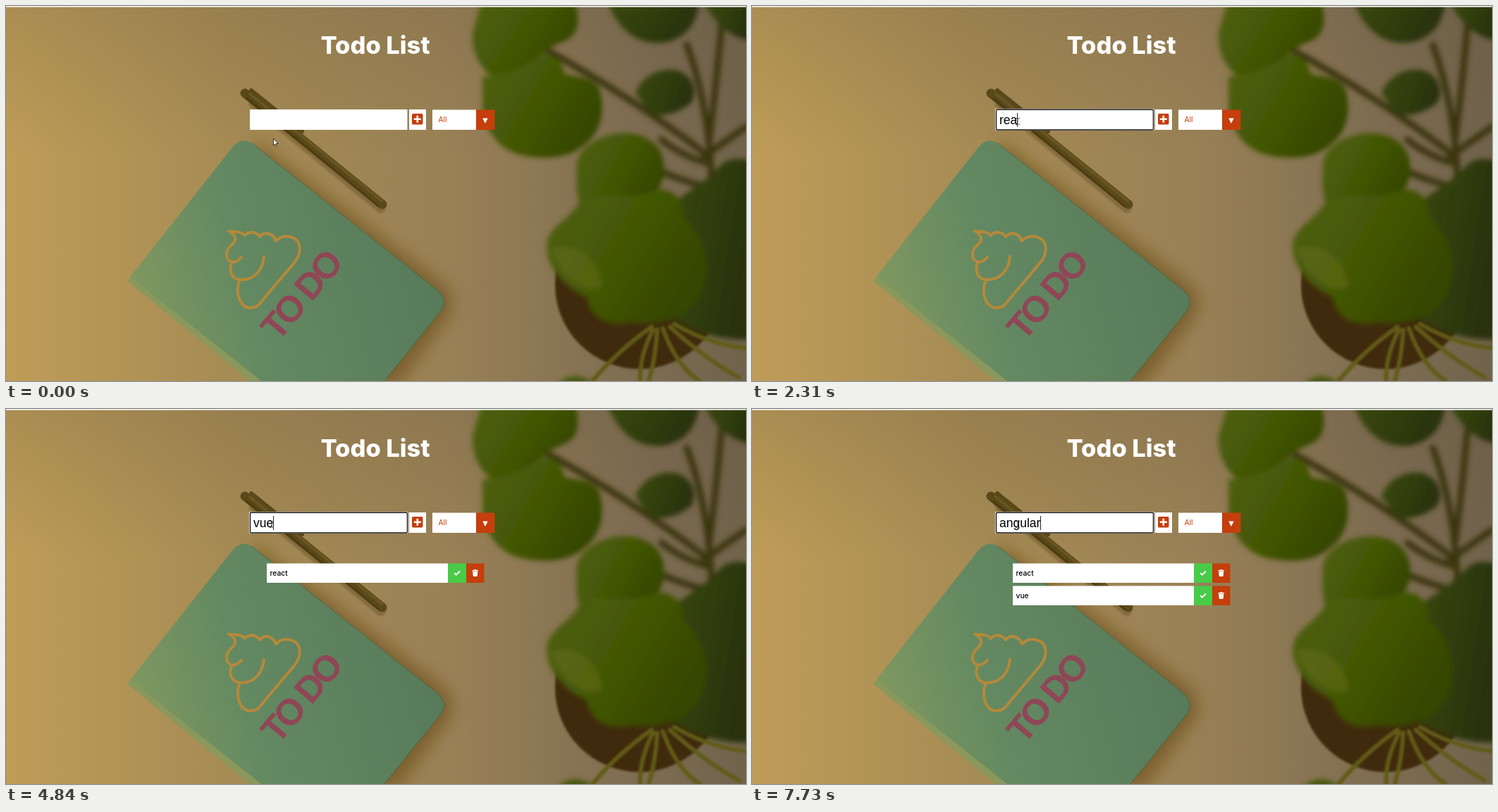
An HTML page that plays this animation: 1050 px wide and 533 px high, repeating every 8 s.

```html
<!DOCTYPE html>
<html lang="en">
<head>
<meta charset="utf-8">
<title>Todo List</title>
<style>
  html, body { margin: 0; width: 100%; height: 100%; overflow: hidden; background: #a08452; }
  svg { display: block; width: 1050px; height: 533px; }
  .ui { font-family: Inter, "Open Sans", sans-serif; }
  .box { fill: #fff; }
  .red { fill: #c43f0c; }
  .line { fill: none; stroke-linecap: round; stroke-linejoin: round; }
</style>
</head>
<body>
<svg viewBox="0 0 1050 533" xmlns="http://www.w3.org/2000/svg">
  <defs>
    <linearGradient id="desk">
      <stop offset="0" stop-color="#bf9d58"/>
      <stop offset=".3" stop-color="#a68b54"/>
      <stop offset=".6" stop-color="#998156"/>
      <stop offset=".85" stop-color="#7e6d52"/>
      <stop offset="1" stop-color="#70634c"/>
    </linearGradient>
    <radialGradient id="glow" gradientUnits="userSpaceOnUse" r="1" gradientTransform="translate(0 533) scale(640 440)">
      <stop offset="0" stop-color="#e7ba60"/>
      <stop offset=".3" stop-color="#dcb05d" stop-opacity=".8"/>
      <stop offset="1" stop-color="#c9a057" stop-opacity="0"/>
    </radialGradient>
    <linearGradient id="shade" x1="0" y1="0" x2="0" y2="1">
      <stop offset="0" stop-color="#5d4f3c" stop-opacity=".2"/>
      <stop offset=".4" stop-color="#6b5532" stop-opacity="0"/>
    </linearGradient>
    <linearGradient id="cover" x1="0" y1=".6" x2="1" y2=".4">
      <stop offset="0" stop-color="#80985f"/>
      <stop offset=".35" stop-color="#638962"/>
      <stop offset="1" stop-color="#577959"/>
    </linearGradient>
    <linearGradient id="leaf" x1="0" y1="0" x2="1" y2=".5">
      <stop offset="0" stop-color="#50600f"/>
      <stop offset=".5" stop-color="#445806"/>
      <stop offset="1" stop-color="#354606"/>
    </linearGradient>
    <linearGradient id="dark" x1="0" y1="0" x2="1" y2=".3">
      <stop offset="0" stop-color="#3a4a08"/>
      <stop offset="1" stop-color="#293207"/>
    </linearGradient>
    <filter id="soft" x="-20%" y="-20%" width="140%" height="140%"><feGaussianBlur stdDeviation="3.5"/></filter>
    <filter id="near" x="-20%" y="-20%" width="140%" height="140%"><feGaussianBlur stdDeviation="1.5"/></filter>
    <filter id="far" x="-20%" y="-20%" width="140%" height="140%"><feGaussianBlur stdDeviation="11"/></filter>
    <g id="row">
      <rect class="box" x="370" y="219.5" width="257" height="27.5"/>
      <rect x="627" y="219.5" width="26" height="27.5" fill="#49cb49"/>
      <rect class="red" x="653" y="219.5" width="25.5" height="27.5"/>
      <path d="M636.2 233.2l2.6 2.5 5.2-5.2" fill="none" stroke="#fff" stroke-width="2"/>
      <path d="M661.5 229h2.4l.7-.9h2.3l.7.9h2.4v1.4h-8.5zM662.2 231h7.1l-.5 6q-.1.9-1 .9h-4.1q-.9 0-1-.9z" fill="#fff"/>
    </g>
  </defs>

  <rect width="1050" height="533" fill="url(#desk)"/>
  <rect width="1050" height="533" fill="url(#glow)"/>
  <rect width="1050" height="533" fill="url(#shade)"/>

  <!-- plant -->
  <circle cx="899" cy="396" r="120" fill="#402a09" filter="url(#near)"/>
  <g filter="url(#soft)">
    <g class="line" stroke="#3b3411" stroke-width="9">
      <path d="M766 62Q886 128 998 214M966 55Q990 120 998 200T990 262M1016 20Q1008 110 998 190M930 190Q960 214 998 224M900 222Q950 246 990 256M1050 172L990 214"/>
    </g>
    <path fill="url(#dark)" d="M852-10C870 42 905 58 938 51C968 44 982 20 984-10Z"/>
    <path fill="url(#dark)" d="M893 124C902 98 930 86 954 92C975 100 982 122 972 138C952 154 930 158 914 153Z"/>
    <path fill="url(#dark)" d="M988-10H1060V50C1030 46 1006 28 988-10Z"/>
    <path fill="url(#dark)" d="M930 300C950 268 990 256 1012 228C1024 216 1040 214 1060 222V474C1010 476 970 462 940 440Z"/>
    <path fill="url(#leaf)" d="M676-10H806C816 18 812 40 796 48C780 56 764 60 756 76C744 98 720 106 696 102C678 96 660 70 662 38Z"/>
    <path fill="url(#leaf)" d="M676 100C700 98 730 92 754 72C772 62 790 76 792 96C806 102 830 98 842 118C850 146 846 178 822 196C800 216 770 219 736 213C700 206 682 180 676 148Z"/>
    <path fill="url(#leaf)" d="M810 232C806 206 836 184 870 181C908 178 934 198 934 230C934 258 916 278 890 295H818C810 274 808 254 810 232Z"/>
    <path fill="url(#leaf)" d="M767 340C770 312 800 304 814 278C850 258 890 280 920 262C946 256 962 276 960 300C990 324 1004 372 986 408C970 444 928 456 886 450C850 458 828 440 824 414C800 404 766 376 767 340Z"/>
    <path fill="#7a7a28" opacity=".3" d="M772 345C800 334 840 352 846 398C830 412 790 392 772 345Z"/>
    <path fill="#45580a" d="M780 540Q808 512 836 540Z"/>
  </g>
  <g class="line" filter="url(#near)" stroke="#615c16" stroke-width="6">
    <path d="M916 456Q868 490 832 533M918 460Q898 500 900 533M924 460Q922 500 912 533M932 458Q950 510 984 533M942 456Q990 500 1040 528M948 452Q1000 482 1050 486"/>
  </g>

  <!-- notebook and pen -->
  <path filter="url(#far)" opacity=".55" fill="#65450f" d="M350 190L622 396Q642 420 626 444L556 540H400Z"/>
  <path class="line" filter="url(#near)" opacity=".4" stroke="#5d4314" stroke-width="14" d="M352 139L532 287"/>
  <path fill="#8a985c" d="M172 391L180 381L370 533H346Z"/>
  <path fill="url(#cover)" d="M176 385L322 200Q334 186 349 195L611 403Q629 418 616 435L537 533H362Z"/>
  <path class="line" stroke="#41603f" stroke-width="1.5" opacity=".4" d="M349 195L611 403Q629 418 616 435L537 533"/>
  <g class="line">
    <path stroke="#594819" stroke-width="13" d="M339 124L534 282"/>
    <path stroke="#594819" stroke-width="6" d="M348 120L420 178"/>
    <path stroke="#685520" stroke-width="4" d="M346 125L533 277"/>
    <path stroke="#4a3b12" stroke-width="2.5" d="M342 131L529 285"/>
    <path stroke="#b4893a" stroke-width="4" d="M316 320C325 324 328 332 322 338C311 346 309 360 321 364C315 376 320 388 332 389C324 408 332 428 346 429C358 430 362 420 370 411L408 366C420 352 420 334 406 329C396 325 389 328 383 334C379 322 366 320 360 328C354 320 344 320 339 326C334 320 325 321 316 320M321 364Q328 364 334 357M332 389C352 390 364 376 366 356"/>
  </g>
  <text transform="translate(418 411) rotate(-50)" y="18.5" text-anchor="middle" font-family="'Liberation Sans', Arial, sans-serif" font-weight="700" font-size="52" letter-spacing="-4" fill="#8f4656">TO DO</text>

  <rect class="box" width="1050" height="1.5"/>

  <!-- page -->
  <g class="ui">
    <text x="524" y="67.5" text-anchor="middle" font-size="34.5" font-weight="800" fill="#fff">Todo List</text>
    <rect class="box" x="346" y="147" width="223.5" height="29"/>
    <g id="ring">
      <rect class="box" x="345" y="146" width="226" height="31" rx="2"/>
      <rect x="346.5" y="147.25" width="223" height="28.75" rx="1.5" fill="#fff" stroke="#101010" stroke-width="1.4"/>
    </g>
    <rect class="box" x="572" y="147" width="24" height="29"/>
    <rect class="red" x="576" y="153" width="15.5" height="15.5" rx="1.7"/>
    <path stroke="#fff" stroke-width="2.6" d="M578.8 160.7h10M583.8 155.7v10"/>
    <rect class="box" x="605" y="147.5" width="62" height="28.5"/>
    <text x="613.5" y="165" font-size="10.3" fill="#c43f0c">All</text>
    <rect class="red" x="667" y="147.5" width="26.5" height="28.5"/>
    <path fill="#fff" d="M676.3 159.5h7.4l-3.7 7.5z"/>
    <g id="first">
      <use href="#row"/>
      <text x="374.5" y="236.7" font-size="10.3" font-weight="500">react</text>
    </g>
    <g id="second">
      <use href="#row" y="32"/>
      <text x="374.5" y="268.7" font-size="10.3" font-weight="500">vue</text>
    </g>
  </g>
  <text id="entry" x="351" y="167.5" font-family="'Liberation Sans', Arial, sans-serif" font-size="17.5"></text>
  <rect id="caret" y="152" width="1" height="20" fill="#222"/>
  <path id="arrow" d="M0 0V9.5L2.2 7.5L3.7 11L5.2 10.3L3.7 7H6.6Z" fill="#fff" stroke="#222" stroke-width=".9"/>
  <path id="beam" class="line" d="M-2.5-4.5Q0-4.5 0-3.5Q0-4.5 2.5-4.5M0-3.5V3.5M-2.5 4.5Q0 4.5 0 3.5Q0 4.5 2.5 4.5" stroke="#444" stroke-width="1"/>
</svg>
<script>
  const LOOP = 8000;
  const $ = id => document.getElementById(id);

  // time, typed text, caret visible
  const typing = [
    [0, "", 0], [485, "", 1], [1000, "", 0], [1510, "", 1],
    [1870, "r", 1], [2190, "re", 1], [2310, "rea", 1], [2550, "reac", 1], [2790, "react", 1],
    [3340, "react", 0], [3380, "", 0], [3850, "", 1],
    [4250, "v", 1], [4720, "vu", 1], [4840, "vue", 1],
    [5270, "", 1], [5350, "", 0], [5860, "", 1],
    [5980, "a", 1], [6140, "an", 1], [6420, "ang", 1], [6860, "angu", 1],
    [7140, "angul", 1], [7460, "angula", 1], [7730, "angular", 1]
  ];
  // time, pointer shape, position
  const pointer = [
    [0, "arrow", 379.5, 188.5], [30, "arrow", 379.5, 185.5], [77, "arrow", 378.5, 178],
    [123, "beam", 377.5, 167.5], [170, "beam", 377, 164]
  ];
  const focus = [[0, 0], [450, .4], [485, .8], [520, 1]];

  const at = (steps, t) => steps.findLast(s => s[0] <= t);
  const show = (id, on) => $(id).setAttribute("visibility", on ? "visible" : "hidden");

  function draw(t) {
    const [, text, caret] = at(typing, t);
    const entry = $("entry");
    if (entry.textContent !== text) entry.textContent = text;
    const width = text ? entry.getComputedTextLength() : 0;
    $("caret").setAttribute("x", Math.round(351 + width));
    show("caret", caret);

    const [, shape, x, y] = at(pointer, t);
    for (const id of ["arrow", "beam"]) show(id, id === shape);
    $(shape).setAttribute("transform", `translate(${x} ${y})`);

    $("ring").setAttribute("opacity", at(focus, t)[1]);
    show("first", t >= 3380);
    show("second", t >= 5270);
  }

  const start = performance.now();
  function frame() {
    draw((performance.now() - start) % LOOP);
    requestAnimationFrame(frame);
  }
  frame();
</script>
</body>
</html>
```
